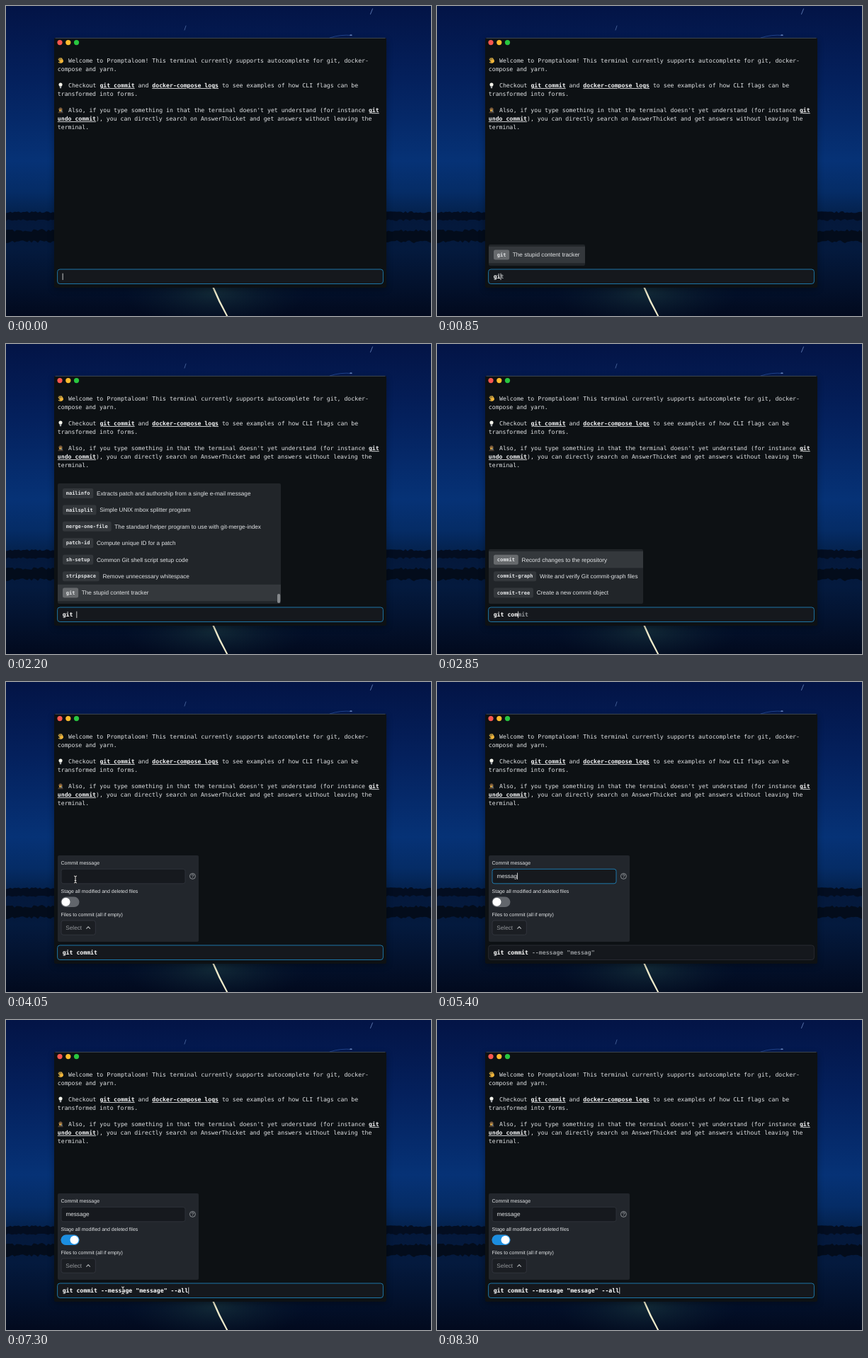
An HTML page that plays this animation: 600x438 px, repeating every 8.35 s.

```html
<!DOCTYPE html>
<html lang="en">
<head>
<meta charset="utf-8">
<title>Terminal autocomplete</title>
<style>
  html, body { margin: 0; width: 100%; height: 100%; overflow: hidden; background: #020b1c; }
  svg { display: block; width: 600px; height: 438px; }
  text { white-space: pre; text-rendering: geometricPrecision; fill: #e2e4e6; }
  .mono { font: 8.2px "DejaVu Sans Mono", monospace; }
  .bold { font-weight: 700; fill: #fff; }
  .link { font-weight: 700; fill: #f4f5f6; text-decoration: underline; }
  .badge { font: 700 7.03px "DejaVu Sans Mono", monospace; }
  .sans { font: 8.2px "Liberation Sans", Arial, sans-serif; }
  .label { font: 7.03px "Liberation Sans", Arial, sans-serif; }
  .dim { fill: #94979b; }
</style>
</head>
<body>
<svg viewBox="0 0 600 438">
  <defs>
    <linearGradient id="sky" x2="0" y2="1">
      <stop offset="0" stop-color="#031446"/>
      <stop offset=".35" stop-color="#04205c"/>
      <stop offset=".75" stop-color="#063276"/>
      <stop offset=".9" stop-color="#052c66"/>
      <stop offset="1" stop-color="#04224e"/>
    </linearGradient>
    <linearGradient id="water" x2="0" y2="1">
      <stop offset="0" stop-color="#04183a"/>
      <stop offset=".35" stop-color="#041a3e"/>
      <stop offset="1" stop-color="#020a1e"/>
    </linearGradient>
    <radialGradient id="glow">
      <stop offset="0" stop-color="#16303a" stop-opacity=".8"/>
      <stop offset="1" stop-color="#0a1c30" stop-opacity="0"/>
    </radialGradient>
    <filter id="soft" x="-10%" y="-10%" width="120%" height="120%"><feGaussianBlur stdDeviation="5"/></filter>
  </defs>

  <rect width="600" height="292" fill="url(#sky)"/>
  <rect y="292" width="600" height="146" fill="url(#water)"/>
  <g id="shore"></g>
  <g fill="none" stroke="#7f9fd8" stroke-width=".9" stroke-linecap="round">
    <path d="M514.500 11.500L517.500 4" opacity=".75"/>
    <path d="M252 34L254 28" opacity=".55"/>
    <path d="M457 45Q472 40 488 41.500" stroke="#2f56a8" stroke-width=".7"/>
    <path d="M486 41.200H488" stroke-width="1.200"/>
  </g>
  <ellipse cx="295" cy="405" rx="130" ry="48" fill="url(#glow)"/>
  <path d="M291 397Q299.500 418 311 438L313.300 438Q302 417 293.500 397Z" fill="#eeeacb"/>

  <rect x="68" y="48" width="469" height="352" fill="#000" opacity=".35" filter="url(#soft)"/>
  <rect x="68" y="45" width="469" height="353" rx="2" fill="#0d1114"/>
  <path d="M69.500 45.400H535.500" stroke="#4b5360" stroke-width=".8"/>
  <circle cx="76" cy="51.600" r="3.600" fill="#f9564f"/>
  <circle cx="87.800" cy="51.600" r="3.600" fill="#fdbc2e"/>
  <circle cx="99.500" cy="51.600" r="3.600" fill="#28c63f"/>

  <g id="wave" transform="translate(77.300 77) rotate(-35) scale(.82)">
    <path d="M-2.500 3.500L-4.800 .5M-2 1V-4M-.2 1V-4.700M1.600 1V-4.200M3.200 1.500V-2.800" stroke="#f5c14a" stroke-width="1.200" stroke-linecap="round"/>
    <ellipse cx=".4" cy="2" rx="3.100" ry="2.800" fill="#f3b63a"/>
  </g>
  <g id="bulb" transform="translate(77 112.300) scale(.88)">
    <circle cy="-1.500" r="2.900" fill="#f3f3ea"/>
    <path d="M-1.500 .7H1.500L1.200 4.500H-1.200Z" fill="#a6aaad"/>
  </g>
  <g id="detective" transform="translate(77 147.300) scale(.82)">
    <path d="M-4.500 4.700Q-4 1.200 0 1.200Q4 1.200 4.500 4.700Z" fill="#4a3d33"/>
    <circle cy="-.3" r="2.700" fill="#e0a944"/>
    <path d="M-4.300 -1.600Q0 -.3 4.300 -1.600L2.500 -2.800Q2 -4.800 0 -4.500Q-2 -4.800 -2.500 -2.800Z" fill="#7d5c3c"/>
    <circle cx="2" cy="1.400" r="1.300" fill="#9db4c0" stroke="#34383c" stroke-width=".6"/>
  </g>

  <g class="mono">
    <text x="88" y="80">Welcome to Promptaloom! This terminal currently supports autocomplete for git, docker-</text>
    <text x="72.800" y="91.700">compose and yarn.</text>
    <text x="88" y="115.100">Checkout <tspan class="link">git commit</tspan> and <tspan class="link">docker-compose logs</tspan> to see examples of how CLI flags can be</text>
    <text x="72.800" y="126.800">transformed into forms.</text>
    <text x="88" y="150.300">Also, if you type something in that the terminal doesn't yet understand (for instance <tspan class="link">git</tspan></text>
    <text x="72.800" y="162"><tspan class="link">undo commit</tspan>), you can directly search on AnswerThicket and get answers without leaving the</text>
    <text x="72.800" y="173.700">terminal.</text>
  </g>
  <g id="live"></g>
</svg>

<script>
const LOOP = 8350;
const BLUE = '#1f86c0';
const MONO = 8.2 * 0.602;      // advance of one prompt character
const BADGE = 7.03 * 0.602;
const ROW = 23.44;
const PANEL_BOTTOM = 367;
const live = document.getElementById('live');

const gitRow = ['git', 'The stupid content tracker'];
const subcommands = [
  ['mailinfo', 'Extracts patch and authorship from a single e-mail message'],
  ['mailsplit', 'Simple UNIX mbox splitter program'],
  ['merge-one-file', 'The standard helper program to use with git-merge-index'],
  ['patch-id', 'Compute unique ID for a patch'],
  ['sh-setup', 'Common Git shell script setup code'],
  ['stripspace', 'Remove unnecessary whitespace'],
  gitRow
];
const commits = [
  ['commit', 'Record changes to the repository'],
  ['commit-graph', 'Write and verify Git commit-graph files'],
  ['commit-tree', 'Create a new commit object']
];

// [time, typed text]
const promptKeys = [[0, ''], [600, 'g'], [800, 'gi'], [1000, 'git'], [2200, 'git '],
  [2380, 'git c'], [2540, 'git co'], [2700, 'git com'], [3450, 'git commit']];
const messageKeys = [[4250, '']].concat(
  [...'message'].map((_, i) => [4620 + i * 150, 'message'.slice(0, i + 1)]));
const FORM_AT = 3450, FIELD_CLICK = 4250, TOGGLE_CLICK = 6450, PROMPT_CLICK = 7250;

// pointer tracks: [time, x, y]
const pointerTracks = [
  [[3650, 190, 345], [3980, 98, 279], [4600, 98, 279]],
  [[5720, 98, 279], [6080, 88, 314], [6700, 88, 314], [7150, 165, 382], [7600, 165, 382]]
];

const clamp = v => Math.max(0, Math.min(1, v));
const ease = v => { v = clamp(v); return v * v * (3 - 2 * v); };
const latest = (keys, t) => keys.filter(k => k[0] <= t).pop();
const blinkOn = age => age % 1000 < 500;

const rect = (x, y, w, h, r, fill, stroke) =>
  `<rect x="${x}" y="${y}" width="${w}" height="${h}" rx="${r}" fill="${fill}"` +
  (stroke ? ` stroke="${stroke}" stroke-width=".85"` : '') + '/>';
const text = (x, y, cls, str) => `<text x="${x}" y="${y}" class="${cls}">${str}</text>`;
const caret = (x, y) => rect(x, y, .8, 9.4, 0, '#f2f2f2');

function suggestions(rows, selected, right, height, scrolled) {
  const top = PANEL_BOTTOM - height;
  const first = PANEL_BOTTOM - 3.7 - rows.length * ROW;
  let out = rect(73, top, right - 73, height, 2, '#212529');
  rows.forEach(([name, info], i) => {
    const y = first + i * ROW, mid = y + ROW / 2, active = i === selected;
    const width = name.length * BADGE + 9.4;
    if (active) out += rect(73, y, right - 73, ROW, 0, '#34383c');
    out += rect(80, mid - 7, width, 14, 2.5, active ? '#676a6d' : '#33373b');
    out += text(84.7, mid + 2.2, 'badge', name);
    out += text(80 + width + 4.7, mid + 2.8, 'sans', info);
  });
  return out + (scrolled ? rect(383, 353, 4.2, 13, 2, '#85888b') : '');
}

function suggestionsFor(typed) {
  if (!typed) return '';
  if (typed.length < 3) return suggestions([gitRow], 0, 209, 30);
  if (typed.length < 5) return suggestions(subcommands, 6, 388, 170, true);
  return suggestions(commits, 0, 291, 77);
}

function form(t, pointer) {
  const focused = t >= FIELD_CLICK && t < TOGGLE_CLICK;
  const key = latest(messageKeys, t);
  const on = ease((t - TOGGLE_CLICK) / 200);
  const hover = pointer && pointer.shape === 'hand';
  let out = rect(73, 245, 199, 122, 2, '#22262c');
  out += text(77.5, 258, 'label', 'Commit message');
  out += rect(78, 264.3, 175, 20.5, 3, '#16191e', focused ? BLUE : '#30343b');
  if (key) {
    out += text(84.4, 277.4, 'sans', key[1]);
    if (focused && blinkOn(t - key[0])) {
      const widths = { m: .833, s: .5 };
      const x = [...key[1]].reduce((sum, c) => sum + 8.2 * (widths[c] || .556), 84.5);
      out += caret(x, 269.6);
    }
  }
  out += '<circle cx="263.4" cy="274.4" r="4" fill="none" stroke="#a4a7ab" stroke-width=".8"/>' +
    '<path d="M262 273.4Q262 272 263.4 272Q264.9 272 264.9 273.3Q264.9 274.1 263.4 274.7V275.3M263.4 276.3V277" fill="none" stroke="#a4a7ab" stroke-width=".8"/>';
  out += text(77.5, 298, 'label', 'Stage all modified and deleted files');
  out += rect(77.5, 303.5, 26, 14.6, 7.3, hover ? '#7c8086' : '#62666c');
  out += `<g opacity="${on}">${rect(77.5, 303.5, 26, 14.6, 7.3, '#1b8ee0')}</g>`;
  out += `<circle cx="${84.5 + 12 * on}" cy="310.8" r="6" fill="#fff"/>`;
  out += text(77.5, 330.8, 'label', 'Files to commit (all if empty)');
  out += rect(78, 337, 48.3, 20.3, 3, '#1b1e23', '#343840');
  out += text(84.3, 350.2, 'sans dim', 'Select');
  return out + '<path d="M113.4 348.6L116.1 345.9L118.8 348.6" fill="none" stroke="#b4b7ba" stroke-width="1.1"/>';
}

function prompt(t) {
  const focused = t < FIELD_CLICK || t >= PROMPT_CLICK;
  const [keyTime, typed] = latest(promptKeys, t);
  const message = (latest(messageKeys, t) || [0, ''])[1];
  const args = (message ? ` --message "${message}"` : '') + (t >= TOGGLE_CLICK ? ' --all' : '');
  const goal = typed.length < 4 ? 'git' : typed.length > 4 ? 'git commit' : typed;
  const ghost = typed ? goal.slice(typed.length) : '';
  const argClass = focused ? 'bold' : 'bold dim';
  let out = rect(72.6, 372, 459.8, 20.5, 3.5, '#15181d', focused ? BLUE : '#2b2e34');
  out += text(79.7, 385.3, 'mono bold',
    `${typed}<tspan class="bold dim">${ghost}</tspan><tspan class="${argClass}">${args}</tspan>`);
  const since = t >= PROMPT_CLICK ? PROMPT_CLICK : keyTime;
  if (focused && blinkOn(t - since)) out += caret(79.7 + (typed + args).length * MONO, 377.7);
  return out;
}

function pointerAt(t) {
  const track = pointerTracks.find(k => t >= k[0][0] && t < k[k.length - 1][0]);
  if (!track) return null;
  const i = track.findIndex(k => k[0] > t);
  const [t0, x0, y0] = track[i - 1], [t1, x1, y1] = track[i];
  const p = ease((t - t0) / (t1 - t0));
  const x = x0 + (x1 - x0) * p, y = y0 + (y1 - y0) * p;
  const inField = x > 78 && x < 253 && y > 264 && y < 285;
  const onToggle = x > 77 && x < 104 && y > 303 && y < 319;
  return { x, y, shape: inField || y > 372 ? 'beam' : onToggle ? 'hand' : 'arrow' };
}

const beam = 'M-2 -5Q0 -5 0 -3.5Q0 -5 2 -5M0 -3.5V3.5M-2 5Q0 5 0 3.5Q0 5 2 5M-1.2 1.5H1.2';
const cursors = {
  beam: `<path d="${beam}" fill="none" stroke="#111" stroke-width="2.2"/>` +
    `<path d="${beam}" fill="none" stroke="#fff" stroke-width=".9"/>`,
  hand: '<path d="M-1 0Q0 -1 1 0V3Q2 2.500 2.600 3.300Q3.700 3 4 3.900Q5.300 3.700 5.300 5V7L4.300 9.300H-.7L-3.400 5.800Q-3.700 4.600 -2.400 4.800L-1 5.800Z" fill="#fff" stroke="#111" stroke-width=".7"/>',
  arrow: '<path d="M0 0V9L2.100 7.100L3.500 10.200L5 9.500L3.600 6.500H6.400Z" fill="#111" stroke="#fff" stroke-width=".7"/>'
};

function render(t) {
  const pointer = pointerAt(t);
  live.innerHTML =
    (t < FORM_AT ? suggestionsFor(latest(promptKeys, t)[1]) : form(t, pointer)) +
    prompt(t) +
    (pointer ? `<g transform="translate(${pointer.x} ${pointer.y})">${cursors[pointer.shape]}</g>` : '');
}

function drawShore() {
  let seed = 7;
  const random = () => (seed = seed * 16807 % 2147483647) / 2147483647;
  const band = (top, bottom, rough, fill) => {
    let up = '', down = '';
    for (let x = 0; x <= 600; x += 3) {
      up += `L${x} ${(top - random() * rough).toFixed(1)}`;
      down = `L${x} ${(bottom + random() * rough).toFixed(1)}` + down;
    }
    return `<path d="M0 ${top}${up}${down}Z" fill="${fill}"/>`;
  };
  document.getElementById('shore').innerHTML =
    band(293, 301, 3, '#030d20') + band(319, 331, 4, '#030c1b');
}

drawShore();
const start = performance.now();
function tick() {
  render((performance.now() - start) % LOOP);
  requestAnimationFrame(tick);
}
tick();
</script>
</body>
</html>
```
